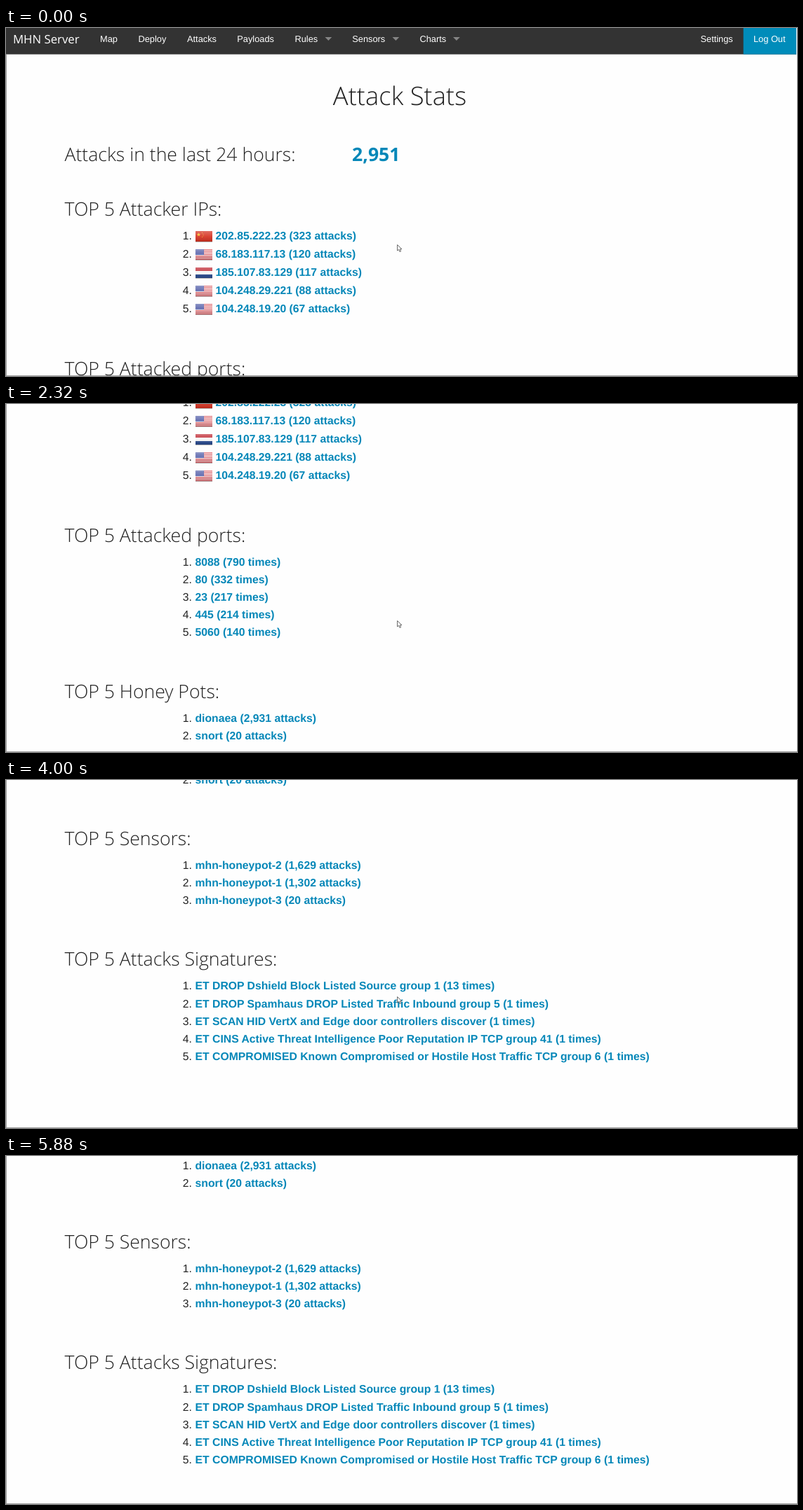
Write an HTML page that moves like this. It is 1127x497 px and loops after 6180 ms.

```html
<!DOCTYPE html>
<html lang="en">
<head>
<meta charset="utf-8">
<title>Attack Stats</title>
<style>
  html, body { margin: 0; width: 100%; height: 100%; overflow: hidden; background: #fefefe; }
  svg { display: block; width: 1127px; height: 497px; overflow: hidden; }
  text { text-rendering: geometricPrecision; white-space: pre; fill: #222; }
  .nav, .num, .link { font-family: "Liberation Sans", Arial, sans-serif; }
  .nav { font-size: 12.8px; fill: #fff; }
  .num { font-size: 15.75px; }
  .link { font-size: 15.75px; font-weight: 700; fill: #0587b8; }
  .brand, .title, .head, .total { font-family: "Open Sans", sans-serif; }
  .brand { font-size: 16.75px; fill: #fff; }
  .title { font-size: 36.4px; font-weight: 300; text-anchor: middle; }
  .head { font-size: 26.6px; font-weight: 300; }
  .total { font-size: 26.6px; font-weight: 700; fill: #0587b8; }
</style>
</head>
<body>
<svg viewBox="0 0 1127 497">
  <defs>
    <linearGradient id="gloss" x1="0" y1="0" x2="0" y2="1">
      <stop offset="0" stop-color="#fff" stop-opacity=".3"/>
      <stop offset=".5" stop-color="#fff" stop-opacity=".1"/>
      <stop offset="1" stop-color="#000" stop-opacity=".14"/>
    </linearGradient>
    <g id="cn">
      <rect width="24" height="15" fill="#d6301f"/>
      <path d="M4.5 2.2l.8 2h2.1l-1.7 1.3.7 2-1.9-1.2-1.9 1.2.7-2-1.7-1.3h2.1z" fill="#f6c62e"/>
      <path d="M9 2h1v1h-1zM10.5 4h1v1h-1zM10.5 6.2h1v1h-1zM9 8h1v1h-1z" fill="#efa72c"/>
    </g>
    <g id="us">
      <rect width="24" height="15" fill="#f7f1f2"/>
      <path d="M0 .6h24M0 2.9h24M0 5.2h24M0 7.5h24M0 9.8h24M0 12.1h24M0 14.4h24" stroke="#d8434a" stroke-width="1.15"/>
      <rect width="12" height="8" fill="#4450a0"/>
      <path d="M1 1.5h11M1 4h11M1 6.5h11" stroke="#b9c0e2" stroke-width=".8" stroke-dasharray="1 1.2"/>
    </g>
    <g id="nl">
      <rect width="24" height="15" fill="#f6f6f6"/>
      <rect width="24" height="5" fill="#c02b35"/>
      <rect y="10" width="24" height="5" fill="#27498f"/>
    </g>
  </defs>
  <g id="page"></g>
  <path d="M.5 38V497M0 496.5H1127" stroke="#a2a2a2"/>
  <path id="edge" d="M.5 0V38" stroke="#a2a2a2"/>
  <g id="cursor">
    <path d="M.6 .6V9L2.6 7.3 4 10.5 5.6 9.9 4.3 6.8H7z" fill="#fff" stroke="#555" stroke-width=".9"/>
  </g>
</svg>
<script>
const LOOP = 6180;
const page = document.getElementById("page");

function add(tag, attrs, content) {
  const el = document.createElementNS("http://www.w3.org/2000/svg", tag);
  for (const key in attrs) el.setAttribute(key, attrs[key]);
  if (content) el.textContent = content;
  return page.appendChild(el);
}
const text = (cls, x, y, content) => add("text", { class: cls, x, y }, content);

// Top bar
add("rect", { width: 1126, height: 37.6, fill: "#333" });
add("rect", { x: 1050.6, width: 75.4, height: 37.6, fill: "#008cba" });
text("brand", 10, 22, "MHN Server");
[["Map", 134], ["Deploy", 188.5], ["Attacks", 258], ["Payloads", 329.3], ["Rules", 411.5],
 ["Sensors", 493.3], ["Charts", 589.5], ["Settings", 989.5], ["Log Out", 1065]]
  .forEach(([label, x]) => text("nav", x, 20, label));
[454.5, 550.5, 637].forEach(x =>
  add("path", { d: `M${x} 13h9.8l-4.9 4.9z`, fill: "#858585" }));

// Headings and lists
text("title", 561, 110, "Attack Stats");
text("head", 83.5, 190, "Attacks in the last 24 hours:");
text("total", 493, 190, "2,951");

function section(title, y, rows, pitch = 25.1) {
  text("head", 83.5, y, title);
  rows.forEach((row, i) => {
    const base = y + 34 + i * pitch;
    const [label, flag] = [].concat(row);
    text("num", 251.8, base, i + 1 + ".");
    if (flag) {
      const top = Math.round(base - 12);
      add("use", { href: "#" + flag, x: 270, y: top });
      add("rect", { x: 270, y: top, width: 24, height: 15, fill: "url(#gloss)" });
      add("rect", { x: 270, y: top + 15, width: 24, height: .7, fill: "#999" });
    }
    text("link", flag ? 298.5 : 269.5, base, label);
  });
}
section("TOP 5 Attacker IPs:", 268, [
  ["202.85.222.23 (323 attacks)", "cn"],
  ["68.183.117.13 (120 attacks)", "us"],
  ["185.107.83.129 (117 attacks)", "nl"],
  ["104.248.29.221 (88 attacks)", "us"],
  ["104.248.19.20 (67 attacks)", "us"]
], 26.1);
section("TOP 5 Attacked ports:", 496, [
  "8088 (790 times)", "80 (332 times)", "23 (217 times)", "445 (214 times)", "5060 (140 times)"
]);
section("TOP 5 Honey Pots:", 719, ["dionaea (2,931 attacks)", "snort (20 attacks)"]);
section("TOP 5 Sensors:", 866, [
  "mhn-honeypot-2 (1,629 attacks)", "mhn-honeypot-1 (1,302 attacks)", "mhn-honeypot-3 (20 attacks)"
]);
section("TOP 5 Attacks Signatures:", 1038.4, [
  "ET DROP Dshield Block Listed Source group 1 (13 times)",
  "ET DROP Spamhaus DROP Listed Traffic Inbound group 5 (1 times)",
  "ET SCAN HID VertX and Edge door controllers discover (1 times)",
  "ET CINS Active Threat Intelligence Poor Reputation IP TCP group 41 (1 times)",
  "ET COMPROMISED Known Compromised or Hostile Host Traffic TCP group 6 (1 times)"
]);

// Each stop is [time, x, y], held until the next one
function play(id, stops) {
  const frames = stops.map(([t, x, y]) => ({
    offset: t / LOOP, transform: `translate(${x}px, ${y}px)`, easing: "step-end"
  }));
  frames.push({ ...frames[frames.length - 1], offset: 1 });
  const run = document.getElementById(id).animate(frames, { duration: LOOP, iterations: Infinity });
  run.startTime = document.timeline.currentTime;
}

const scroll = [
  [0, 0], [740, 22], [870, 48], [1020, 63], [1300, 101], [1450, 176], [1620, 186],
  [1900, 231], [2040, 262], [2320, 299], [2470, 335], [2600, 385], [2850, 440],
  [2990, 472], [3120, 560], [3270, 615], [3420, 639], [3550, 646], [3710, 652],
  [3860, 748], [4000, 773], [4130, 790], [4250, 806], [4370, 819], [4490, 828],
  [4760, 795], [4900, 759], [5050, 745], [5170, 734]
];
play("page", scroll.map(([t, y]) => [t, 0, -y]));
play("edge", [[0, -9, 0], [740, 0, 0]]);
play("cursor", [
  [0, 557, 309], [5050, 620, 322], [5170, 952, 380], [5320, 1003, 421],
  [5440, 1043, 454], [5570, 1076, 481], [5720, 1092, 494], [5880, 1140, 520]
]);
</script>
</body>
</html>
```
